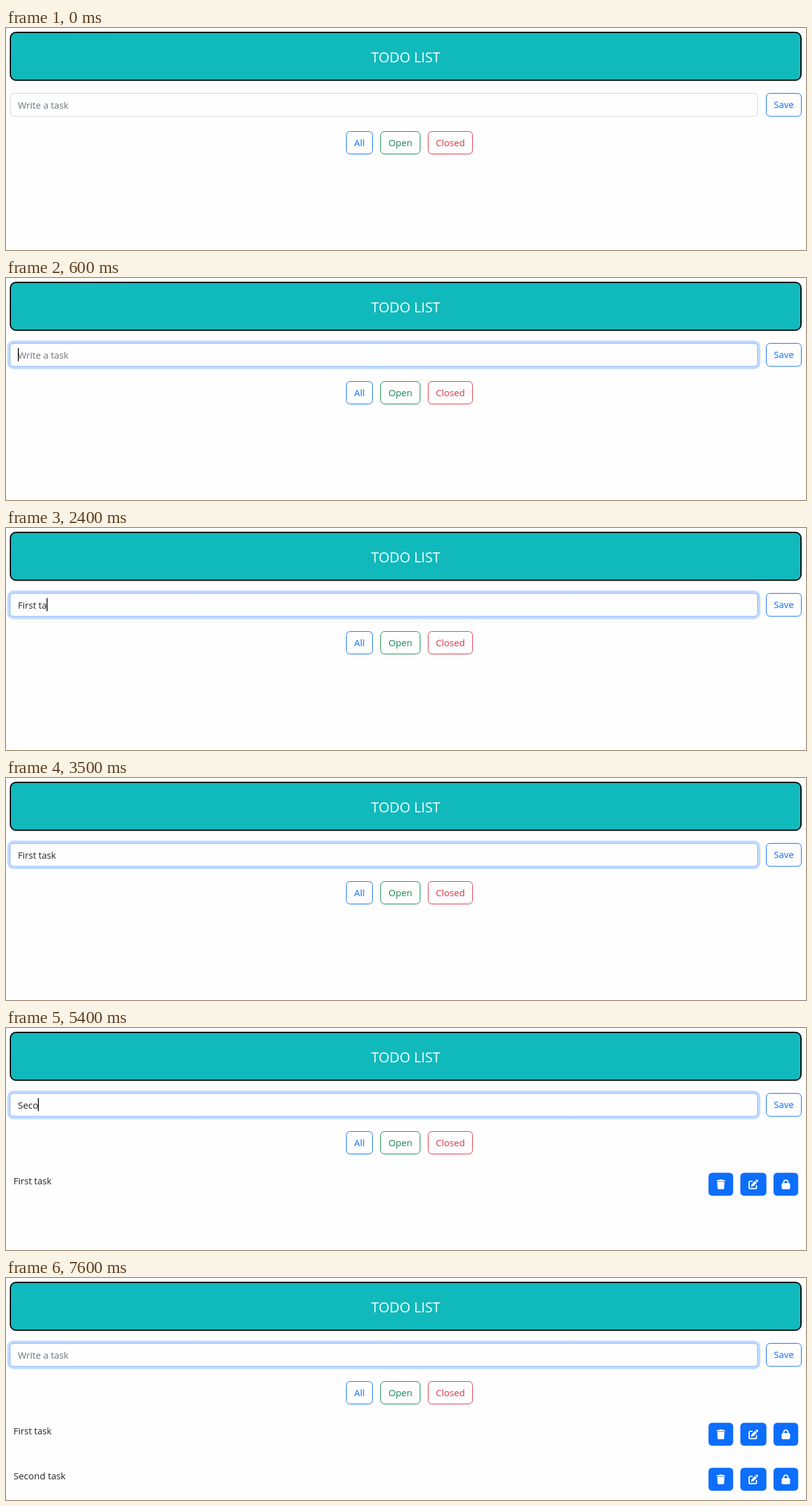
Recreate the animation shown at these times as an HTML page with a canvas. Size 1280x355 px, loop 8000 ms.

```html
<!DOCTYPE html>
<html lang="en">
<head>
<meta charset="utf-8">
<title>Todo list</title>
<style>
  html, body { margin: 0; width: 100%; height: 100%; overflow: hidden; background: #fefefe; }
  canvas { display: block; }
</style>
</head>
<body>
<canvas id="stage" width="1280" height="355"></canvas>
<script>
const ctx = document.getElementById('stage').getContext('2d');
const LOOP = 8000;
const BG = '#fefefe', INK = '#212529', BLUE = '#0d6efd';

// Each task: key press times per character, and when it is saved.
const tasks = [
  { text: 'First task', size: 14.6, y: 231.5, saved: 3600,
    keys: [900, 1100, 1200, 1500, 1700, 1900, 2300, 2400, 3000, 3100] },
  { text: 'Second task', size: 14.95, y: 303.5, saved: 7300,
    keys: [4900, 5200, 5300, 5400, 5700, 5900, 6000, 6500, 6600, 6900, 7100] }
];

// Spans in which the caret is visible.
const caretSpans = [[400, 3500], [4000, 4500], [4900, 7600]];

// Icons on a 512 unit grid.
const icons = [
  { x: 1124, w: 39.5, box: 448, path: new Path2D(
    'M128 32L144 0H304L320 32H416Q448 32 448 64T416 96H32Q0 96 0 64T32 32Z' +
    'M32 128H416L395 467Q392 512 347 512H101Q56 512 53 467Z') },
  { x: 1175, w: 41.7, box: 512, path: new Path2D(
    'M362 52L392 22Q432 -12 472 22L490 40Q524 80 490 120L460 150Z' +
    'M340 74L438 172L270 340Q262 349 248 353L160 383Q122 388 129 352L159 264Q163 251 172 242Z' +
    'M96 64H192A32 32 0 0 1 192 128H96Q64 128 64 160V416Q64 448 96 448H352Q384 448 384 416' +
    'V320A32 32 0 0 1 448 320V416Q448 512 352 512H96Q0 512 0 416V160Q0 64 96 64Z') },
  { x: 1228, w: 39.5, box: 448, path: new Path2D(
    'M80 192V144A144 144 0 0 1 368 144V192H384Q448 192 448 256V448Q448 512 384 512H64' +
    'Q0 512 0 448V256Q0 192 64 192ZM144 192H304V144A80 80 0 0 0 144 144Z') }
];

function box(x, y, w, h, r, fill, stroke, line = 1) {
  ctx.beginPath();
  ctx.roundRect(x, y, w, h, r);
  if (fill) { ctx.fillStyle = fill; ctx.fill(); }
  if (stroke) { ctx.strokeStyle = stroke; ctx.lineWidth = line; ctx.stroke(); }
}

function label(str, x, y, color, size = 14.8, align = 'left') {
  ctx.font = `${size}px "Open Sans", "Noto Sans", sans-serif`;
  ctx.textAlign = align;
  ctx.fillStyle = color;
  ctx.fillText(str, x, y);
}

function button(str, x, y, w, h, color) {
  box(x + 0.5, y + 0.5, w - 1, h - 1, 6, null, color);
  label(str, x + w / 2, y + 24.3, color, 14.8, 'center');
}

function mix(a, b, p) {
  return `rgb(${a.map((v, i) => Math.round(v + (b[i] - v) * p)).join(',')})`;
}

function drawInput(t) {
  const focus = t < 400 ? 0 : t < 500 ? 0.05 : t < 600 ? 0.5 : 1;
  const s = 4 * focus;
  if (s) box(6 - s, 104 - s, 1197 + 2 * s, 37.7 + 2 * s, 6 + s, `rgba(13,110,253,${0.25 * focus})`);
  box(6.5, 104.5, 1196, 36.7, 5.5, BG, mix([206, 212, 218], [134, 183, 254], focus));

  const task = tasks.find(k => t >= k.keys[0] && t < k.saved);
  let caret = 19;
  if (task) {
    const typed = task.text.slice(0, task.keys.filter(k => t >= k).length);
    label(typed, 19, 129, INK, task.size);
    caret = Math.round(18.3 + ctx.measureText(typed).width);
  } else {
    label('Write a task', 19, 129, '#6c757d');
  }
  if (caretSpans.some(([on, off]) => t >= on && t < off)) {
    ctx.fillStyle = '#000';
    ctx.fillRect(caret, 112, 1.4, 21);
  }
}

function drawRow(task) {
  label(task.text, 12, task.y + 18, INK, task.size);
  const k = 15.6 / 512;
  for (const { x, w, box: size, path } of icons) {
    box(x, task.y, w, 36.7, 6, BLUE);
    ctx.save();
    ctx.translate(x + (w - size * k) / 2, task.y + 10.7);
    ctx.scale(k, k);
    ctx.fillStyle = '#fff';
    ctx.fill(path, 'evenodd');
    ctx.restore();
  }
}

function draw(t) {
  ctx.fillStyle = BG;
  ctx.fillRect(0, 0, 1280, 355);
  box(7, 7, 1265, 76.5, 9, '#10b9bb', '#000', 2);
  label('TODO LIST', 639.6, 55, '#fff', 22.2, 'center');
  drawInput(t);
  button('Save', 1216, 104, 57, 37.7, BLUE);
  button('All', 544, 165, 43, 37, BLUE);
  button('Open', 599, 165, 64, 37, '#198754');
  button('Closed', 675, 165, 72, 37, '#dc3545');
  tasks.filter(k => t >= k.saved).forEach(drawRow);
}

const start = performance.now();
function tick() {
  draw((performance.now() - start) % LOOP);
  requestAnimationFrame(tick);
}
tick();
</script>
</body>
</html>
```
